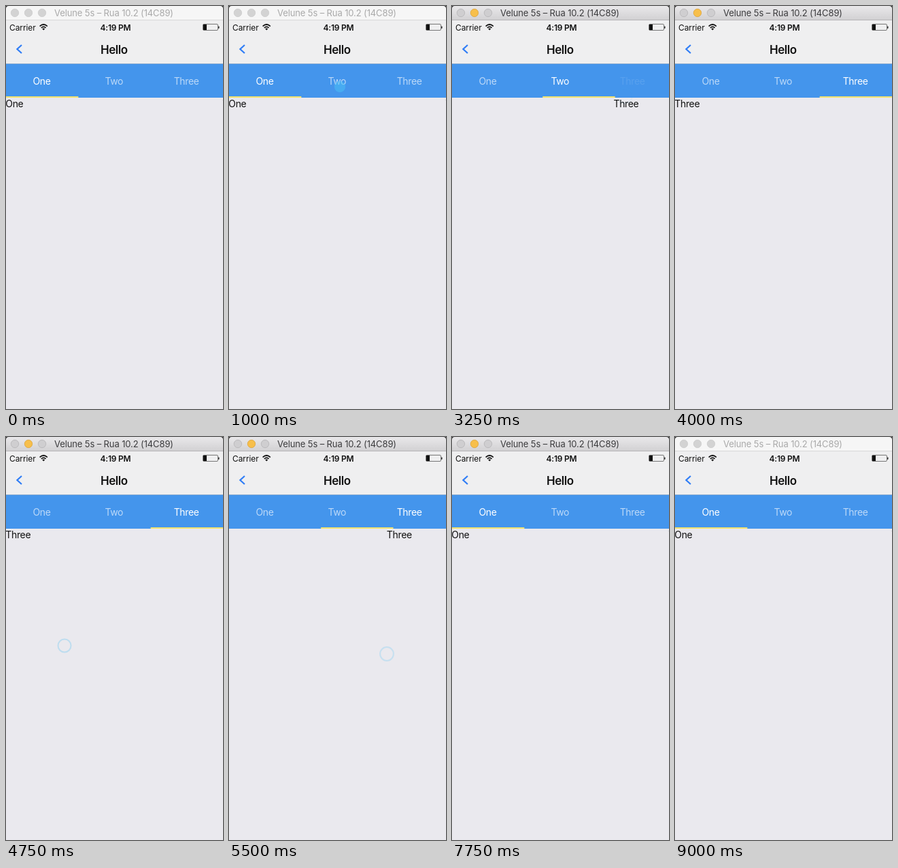
An HTML page that plays this animation: 319 px wide and 589 px high, repeating every 9.5 s.

```html
<!DOCTYPE html>
<html lang="en">
<head>
<meta charset="utf-8">
<title>Swipeable tabs</title>
<style>
  html, body { margin: 0; width: 100%; height: 100%; overflow: hidden; background: #eae9ee; }
  svg { display: block; width: 100%; height: 100%; font-family: Inter, Roboto, sans-serif; }
  .mid { text-anchor: middle; }
  .tab { font-size: 14px; letter-spacing: -.35px; }
</style>
</head>
<body>
<svg viewBox="0 0 319 589">
  <defs>
    <linearGradient id="chrome" x2="0" y2="1">
      <stop offset="0" stop-color="#e9e8ea"/>
      <stop offset="1" stop-color="#d1d0d2"/>
    </linearGradient>
  </defs>
  <rect width="319" height="589" fill="#eae9ee"/>
  <g id="pages" class="tab" fill="#111"></g>

  <rect width="319" height="21" fill="#222"/>
  <path id="bar" d="M0 21V4Q0 0 4 0H315Q319 0 319 4V21Z"/>
  <rect id="barLine" y="20" width="319" height="1"/>
  <g id="lights"></g>
  <text id="title" class="mid" x="158.5" y="15" font-size="13" letter-spacing="-.12">Velune 5s – Rua 10.2 (14C89)</text>

  <rect y="21" width="319" height="64" fill="#efeff0"/>
  <rect y="84" width="319" height="1" fill="#86a9d0"/>
  <text x="5" y="35.5" font-size="12" letter-spacing="-.1" fill="#111">Carrier</text>
  <g fill="none" stroke="#111" stroke-width="1.7">
    <path d="M49.6 29.6Q55.2 24.4 60.8 29.6"/>
    <path d="M51.8 32Q55.2 28.8 58.6 32"/>
  </g>
  <path d="M53.2 33.3Q55.2 31.6 57.2 33.3L55.2 35.6Z" fill="#111"/>
  <text class="mid" x="161" y="35.5" font-size="12" font-weight="600" letter-spacing="-.2" fill="#111">4:19 PM</text>
  <rect x="289.5" y="26.5" width="22" height="9" rx="1.5" fill="none" stroke="#777"/>
  <rect x="290" y="27" width="5" height="8" fill="#111"/>
  <rect x="312" y="29.5" width="1.5" height="3.5" rx=".7" fill="#333"/>
  <path d="M23 57L16.4 63L23 69" fill="none" stroke="#2f7df6" stroke-width="2.2"/>
  <text class="mid" x="158.8" y="69.5" font-size="17" font-weight="600" letter-spacing="-.45" fill="#111">Hello</text>

  <rect y="85" width="319" height="49" fill="#4495ec"/>
  <g id="tabs" class="tab mid" fill="#fff"></g>
  <rect id="marker" y="132" width="106.33" height="2" fill="#f3e36f"/>
  <circle id="touch" stroke-width="2"/>
</svg>
<script>
const LOOP = 9500, STEP = 250, WIDTH = 319, TAB = WIDTH / 3;
const SLIDE = 760, SETTLE = 625;            // page slide, label switch
const LEAD = 500, PRESS = 150, FADE = 250;  // pointer before and after a touch
const NAMES = ['One', 'Two', 'Three'];
const BLUE = '#4abff5';

// Each touch sends the pager to a page; hold is how long the finger stays down.
const MOVES = [
  { at: 1125, page: 1, tap: true, hold: 1300, from: [182, 137], to: [163, 118] },
  { at: 3000, page: 2, tap: true, hold: 50, from: [163, 118], to: [254, 131] },
  { at: 5000, page: 1, hold: 450, from: [86, 305], to: [232, 317] },
  { at: 6900, page: 0, hold: 550, from: [117, 312], to: [258, 321] }
];

const $ = id => document.getElementById(id);
const clamp = x => Math.min(1, Math.max(0, x));
const ease = x => { x = clamp(x); return x * x * (3 - 2 * x); };
const mix = (a, b, f) => a + (b - a) * f;

function set(el, attrs) {
  for (const key in attrs) el.setAttribute(key, attrs[key]);
}
function add(parent, tag, attrs, text = '') {
  const el = document.createElementNS('http://www.w3.org/2000/svg', tag);
  set(el, attrs);
  el.textContent = text;
  return parent.appendChild(el);
}

const pages = NAMES.map(name => add($('pages'), 'text', { y: 148 }, name));
const labels = NAMES.map((name, i) =>
  add($('tabs'), 'text', { x: TAB * (i + .5) - .7, y: 115 }, name));
const lights = NAMES.map((_, i) =>
  add($('lights'), 'circle', { cx: 13 + 20 * i, cy: 10, r: 5.7, 'stroke-width': .8 }));

function drawWindow(active) {
  set($('bar'), { fill: active ? 'url(#chrome)' : '#f6f6f6' });
  set($('barLine'), { fill: active ? '#b5b4b6' : '#d8d8d8' });
  set($('title'), { fill: active ? '#3b3b3d' : '#a9a9a9' });
  lights.forEach((light, i) => set(light, {
    fill: !active ? '#d3d3d3' : i === 1 ? '#f7bf4b' : '#cfced0',
    stroke: !active ? '#cbcbcb' : i === 1 ? '#dca43a' : '#b5b4b6'
  }));
}

function drawTabs(t) {
  let pos = 0, current = 0, pressed = -1;
  for (const { at, page, tap } of MOVES) {
    pos = mix(pos, page, ease((t - at) / SLIDE));
    if (t >= at + SETTLE) current = page;
    else if (tap && t >= at) pressed = page;
  }
  pages.forEach((page, i) => set(page, { x: (i - pos) * WIDTH - .7 }));
  labels.forEach((label, i) =>
    set(label, { opacity: i === current ? 1 : i === pressed ? .1 : .64 }));
  set($('marker'), { x: pos * TAB });
}

function drawTouch(t) {
  const move = MOVES.filter(m => t >= m.at - LEAD).pop();
  const lift = move ? move.at + move.hold : 0;
  const shown = move && t < lift + FADE;
  $('touch').style.display = shown ? '' : 'none';
  if (!shown) return;

  const { at, tap, from, to } = move;
  const f = tap ? ease((t - at + LEAD) / (LEAD - PRESS)) : ease((t - at) / move.hold);
  const down = t >= at - PRESS && t < lift;
  const gone = clamp((t - lift) / FADE);
  set($('touch'), {
    cx: mix(from[0], to[0], f),
    cy: mix(from[1], to[1], f),
    r: down ? 8.2 : 9.5 + 2 * gone,
    fill: down ? BLUE : 'none',
    stroke: down ? 'none' : BLUE,
    opacity: down ? .53 : .28 * (1 - gone)
  });
}

function draw(ms) {
  const t = Math.floor(ms % LOOP / STEP) * STEP;
  drawWindow(t >= 1250 && t < 9000);
  drawTabs(t);
  drawTouch(t);
}

const start = performance.now();
function frame() {
  draw(performance.now() - start);
  requestAnimationFrame(frame);
}
frame();
</script>
</body>
</html>
```
